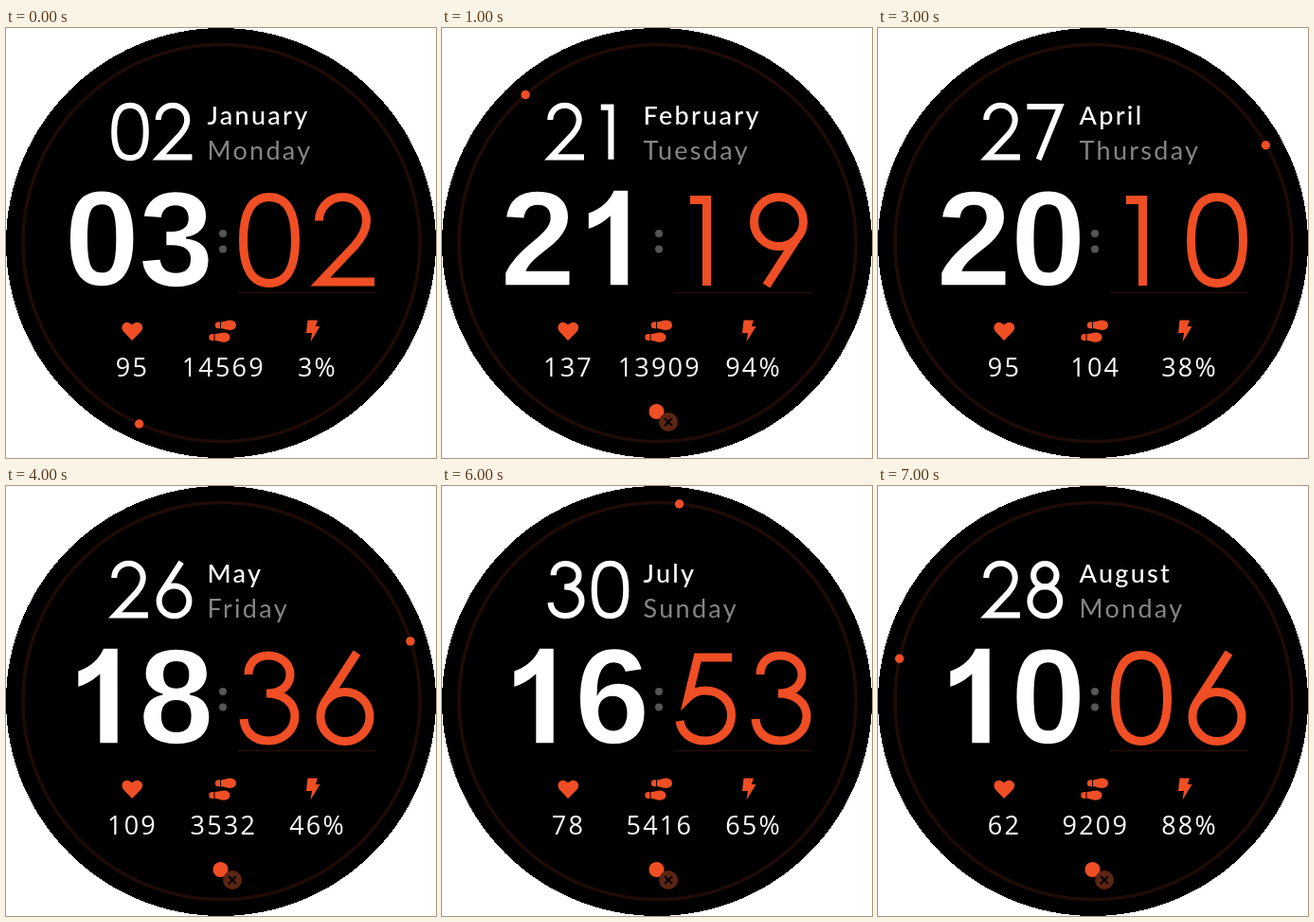
Recreate the animation shown at these times as an HTML page. Size 454 by 454 pixels, loop 8000 ms.

```html
<!DOCTYPE html>
<html lang="en">
<head>
<meta charset="utf-8">
<title>Watch face</title>
<style>
  html, body { margin: 0; width: 100%; height: 100%; overflow: hidden; background: #fff; }
  svg { display: block; width: 454px; height: 454px; }
  .accent { fill: #f04e25; }
  .digit { fill: none; stroke-width: 9; stroke-miterlimit: 8; }
  #date { stroke: #fff; }
  #date .digit { stroke-width: 10; }
  #minutes { stroke: #f04e25; }
  #hours { fill: #fff; stroke: #000; stroke-width: 1.6; font: bold 143px "Liberation Sans", Arial, sans-serif; }
  .label { font: 27px Lato, sans-serif; letter-spacing: 2.3px; }
  #month { fill: #fff; font-weight: 500; }
  #day { fill: #858585; }
  .stat { fill: #fff; font: 27px "Open Sans", sans-serif; letter-spacing: 2.2px; text-anchor: middle; }
</style>
</head>
<body>
<svg viewBox="0 0 454 454">
  <defs>
    <g id="shoe">
      <path d="M6.500 1.800V8.800H4.800A3.500 3.500 0 0 1 4.800 1.800Z"/>
      <path d="M7.500 2C11 1.800 13 0 17 0C21 0 23.500 2.300 23.500 5.200S21 10.400 17.500 10.400C13.500 10.400 11 9 7.500 8.800Z"/>
    </g>
  </defs>

  <circle cx="227" cy="227" r="227" shape-rendering="crispEdges"/>
  <circle cx="227.500" cy="227" r="209.500" fill="none" stroke="#1f0b06" stroke-width="3.500"/>
  <path d="M245 279.500H391" stroke="#260d06" stroke-width="1.500"/>
  <g fill="#555">
    <circle cx="229" cy="217" r="4"/>
    <circle cx="229" cy="233.500" r="4"/>
  </g>

  <g id="date"></g>
  <text id="month" class="label" x="212.500" y="102"></text>
  <text id="day" class="label" x="212.500" y="139"></text>
  <g id="hours"></g>
  <g id="minutes"></g>

  <g class="accent">
    <path d="M133 330L124.500 321C118.500 314 127 306.500 133 313.500C139 306.500 148.500 314 142 321Z"/>
    <use href="#shoe" x="219.500" y="308.500"/>
    <use href="#shoe" transform="translate(213 331.800) scale(1 -1)"/>
    <path d="M318.500 308.500H329L326.800 315H331.500L321.500 331.500L323 322H317Z"/>
  </g>

  <text id="heart" class="stat" x="133.500" y="368"></text>
  <text id="steps" class="stat" x="229.800" y="368"></text>
  <text id="power" class="stat" x="329" y="368"></text>

  <g id="offline">
    <circle class="accent" cx="226.500" cy="405" r="8"/>
    <circle cx="239" cy="416" r="10" fill="#5c2513"/>
    <path d="M235 412l8 8m0-8l-8 8" stroke="#000" stroke-width="2"/>
  </g>
  <circle id="second" class="accent" r="4.700"/>
</svg>

<script>
// Thin numerals as centre lines in a box 100 units high
const THIN = {
  0: 'M4.500 50C4.500 20 14 4.500 32 4.500S59.500 20 59.500 50 50 95.500 32 95.500 4.500 80 4.500 50Z',
  1: 'M16 7.500H33.500V98',
  2: 'M4.500 29.500A25 25 0 0 1 54.500 29.500C54.500 40 49 48 42 56L6 94H63',
  3: 'M10 25C10 12 19 5 31 5S54 13 54 25 44 45 29 45C47 45 59 55 59 69S47 95 31 95 6 85 5 72',
  5: 'M60 7H24L14 49C19 44 25 42 32 42C48 42 59.500 53 59.500 68S48 95 32 95C17 95 7 87 5 74',
  6: 'M44.500 2L10.200 55M6 69.500a26 26 0 1 0 52 0a26 26 0 1 0-52 0',
  7: 'M-1 6.500H56L19 98',
  8: 'M10 25a20 20 0 1 0 40 0a20 20 0 1 0-40 0M4 70a26 25.500 0 1 0 52 0a26 25.500 0 1 0-52 0',
  9: 'M16.500 98L51.300 44M3.500 30.500a26 26 0 1 0 52 0a26 26 0 1 0-52 0'
};
const BOLD_ONE = 'M41 0H57V101H37V29Q27 38 14 42V24Q34 17 41 0Z';

const row = (date, month, day, hours, minutes, second, heart, steps, power, offline) =>
  ({ date, month, day, hours, minutes, second, heart, steps, power, offline });

const STATES = [
  row('02', 'January',  'Monday',    '03', '02', 34, '95',  '14569', '3%',  false),
  row('21', 'February', 'Tuesday',   '21', '19', 53, '137', '13909', '94%', true),
  row('15', 'March',    'Wednesday', '08', '32', 44, '82',  '6250',  '57%', true),
  row('27', 'April',    'Thursday',  '20', '10', 10, '95',  '104',   '38%', false),
  row('26', 'May',      'Friday',    '18', '36', 12, '109', '3532',  '46%', true),
  row('10', 'June',     'Saturday',  '01', '59', 42, '96',  '8773',  '81%', false),
  row('30', 'July',     'Sunday',    '16', '53', 1,  '78',  '5416',  '65%', true),
  row('28', 'August',   'Monday',    '10', '06', 47, '62',  '9209',  '88%', true)
];

const el = id => document.getElementById(id);

const thin = (text, x, y, pitch, scale) => [...text].map((d, i) =>
  `<path class="digit" d="${THIN[d]}" transform="translate(${x + i * pitch} ${y}) scale(${scale})"/>`).join('');

const bold = text => [...text].map((d, i) => {
  const x = 61.5 + i * 78.5;
  return d === '1'
    ? `<path d="${BOLD_ONE}" transform="translate(${x} 171)"/>`
    : `<text x="${x}" y="272">${d}</text>`;
}).join('');

function show(s) {
  el('date').innerHTML = thin(s.date, 111.5, 79, 46.5, 0.61);
  el('hours').innerHTML = bold(s.hours);
  el('minutes').innerHTML = thin(s.minutes, 246, 174, 80, 1);
  for (const id of ['month', 'day', 'heart', 'steps', 'power']) el(id).textContent = s[id];
  el('offline').style.display = s.offline ? '' : 'none';
  const a = (s.second * 6 + 0.4) * Math.PI / 180;
  el('second').setAttribute('cx', 227.2 + 209.5 * Math.sin(a));
  el('second').setAttribute('cy', 227.2 - 209.5 * Math.cos(a));
}

let current = -1;
function tick() {
  const i = Math.floor(performance.now() / 1000) % STATES.length;
  if (i !== current) show(STATES[current = i]);
  requestAnimationFrame(tick);
}
tick();
</script>
</body>
</html>
```
